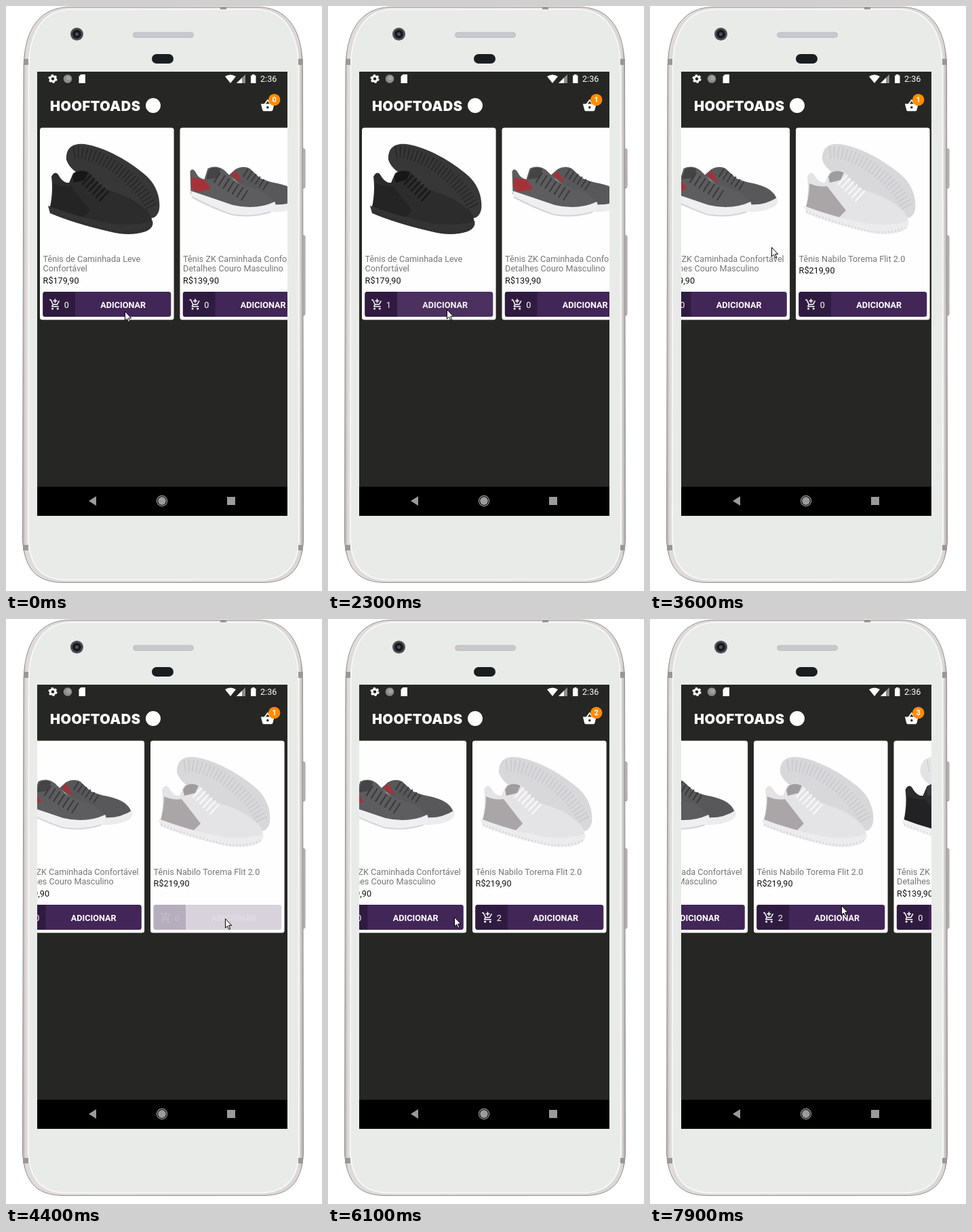
An HTML page that plays this animation: 466 by 864 pixels, repeating every 8 s.

```html
<!DOCTYPE html>
<html lang="pt-BR">
<head>
<meta charset="utf-8">
<title>Loja de tênis</title>
<style>
  html, body { margin: 0; width: 100%; height: 100%; overflow: hidden; background: #fff; }
  svg { display: block; }
  text { font: 12.65px Roboto, sans-serif; }
  .brand { font: 900 20px Inter, sans-serif; letter-spacing: .5px; }
  .bold { font-weight: 700; }
  .name { fill: #757575; }
  .line { fill: none; stroke: #fff; stroke-width: 2; }
  .button > * { opacity: var(--fade); }
</style>
</head>
<body>
<svg width="466" height="864" viewBox="0 0 466 864">
  <defs>
    <clipPath id="screen"><rect x="46" y="97" width="369" height="656"/></clipPath>
    <linearGradient id="rim">
      <stop offset="0" stop-color="#b5b0b0"/><stop offset=".012" stop-color="#e0dbdb"/>
      <stop offset=".988" stop-color="#dcd7d7"/><stop offset="1" stop-color="#a9a4a4"/>
    </linearGradient>
    <g id="cart">
      <path class="line" d="M1 3h2.6l4.3 9h8l4-7.3M8 12l-2 3.4q-.2.6.6.6H19M12 1v8M8 5h8"/>
      <circle cx="7" cy="20" r="2" fill="#fff"/><circle cx="17" cy="20" r="2" fill="#fff"/>
    </g>
  </defs>

  <!-- phone -->
  <g fill="#bdb8b8" stroke="#8f8b8b" stroke-width=".8">
    <rect x="435" y="211" width="6" height="58" rx="2"/>
    <rect x="435" y="339" width="6" height="118" rx="2"/>
  </g>
  <path d="M26 88C28 30 52 1.500 95 1.500H370C412 1.500 436 30 437.500 88L438.500 790C436 835 415 851 380 851.500H84C48 851 28 835 24.500 790Z" fill="url(#rim)" stroke="#938e8e"/>
  <path d="M33.500 88C35 36 56 5 97 5H368C408 5 430 36 431.500 88L432 790C430 830 410 847 376 847.500H88C54 847 36 830 33 790Z" fill="#e9ebe9" stroke="#f6f7f6" stroke-width="2"/>
  <path d="M26 78h7v9h-7zM431 78h7v9h-7zM25 796h8v8h-8zM431 796h7v8h-7zM316 1h9v4h-9z" fill="#9b9797"/>
  <circle cx="104.500" cy="41.500" r="9.500" fill="#4b4e54"/>
  <circle cx="104.500" cy="41.500" r="6.500" fill="#17191d"/>
  <circle cx="104.500" cy="41.500" r="2.500" fill="#4a5366"/>
  <rect x="187.500" y="39" width="89" height="7.500" rx="3.700" fill="#c9c8cd" stroke="#bdbcc1"/>
  <rect x="215" y="71" width="32" height="14" rx="7" fill="#1b1e21"/>

  <!-- screen -->
  <rect x="46" y="97" width="369" height="656" fill="#262625"/>
  <g fill="#fff">
    <circle cx="69" cy="107.500" r="3.800" fill="none" stroke="#fff" stroke-width="3"/>
    <circle cx="69" cy="107.500" r="5.600" fill="none" stroke="#fff" stroke-width="2" stroke-dasharray="3 2.860"/>
    <circle cx="91" cy="107.500" r="6.300" fill="#8b8b8b"/>
    <circle cx="92" cy="106.500" r="3.500" fill="#a2a2a2"/>
    <path d="M110.500 101H117v13h-9.500v-10z"/>
    <path d="M323 104q8-5 16 0l-8 10z"/>
    <path d="M353 101v13h-13z" fill="#8d8d8d"/><path d="M348 106v8h-8z"/>
    <path d="M361 102.500h2V101h3.500v1.500h2V114H361z"/>
    <text x="375" y="112" font-weight="500">2:36</text>
    <text class="brand" x="65" y="155">HOOFTOADS</text>
    <circle cx="217" cy="147" r="11"/>
    <g transform="translate(375 136.300) scale(.9)">
      <path fill-rule="evenodd" d="M1 9H23L20.400 19.500Q20 21 18.500 21H5.500Q4 21 3.600 19.500ZM10 15a2 2 0 0 0 4 0a2 2 0 0 0-4 0"/>
      <path class="line" d="M7 10L12 3L17 10"/>
    </g>
    <circle cx="395.700" cy="138.500" r="8.700" fill="#ff8c00"/>
    <text id="badge" class="bold" x="395.700" y="142.400" text-anchor="middle" style="font-size:11px"></text>
  </g>

  <g clip-path="url(#screen)"><g id="list"></g></g>

  <rect x="46" y="710" width="369" height="43"/>
  <g fill="#9b9b9b">
    <path d="M122 731l11-7v14z"/>
    <circle cx="230" cy="731" r="5.900"/>
    <circle cx="230" cy="731" r="7.600" fill="none" stroke="#9b9b9b" stroke-width="1.200"/>
    <rect x="326" y="725" width="12" height="12"/>
  </g>
  <path id="cursor" d="M.5.500V14L3.600 11.200L5.800 16.300L7.800 15.400L5.700 10.400H9.800Z" fill="#fff" stroke="#000"/>
</svg>

<script>
const $ = id => document.getElementById(id);
const path = (d, fill) => `<path d="${d}" fill="${fill}"/>`;
const ribs = (d, color, width, dash) =>
  `<path d="${d}" fill="none" stroke="${color}" stroke-width="${width}" stroke-dasharray="${dash}"/>`;

// A pair with one shoe turned to show its sole
const knit = c => `
  ${path("M39 227C38 208 50 202 66 204C95 208 132 229 156 250C172 264 178 284 176 300C174 311 167 315 158 313L110 280L62 250Q44 242 39 227Z", c.under)}
  ${ribs("M50 217C82 212 142 250 165 298", c.rib, 18, "1.5 4.5")}
  ${path("M17 252Q22 243 27 249Q34 262 43 261L49 247Q58 241 71 244L85 262Q92 269 104 273Q136 283 152 297Q167 308 165 320L140 328Q80 322 14 302Q20 275 17 252Z", c.upper)}
  ${path("M20 262Q34 268 46 266L74 302L62 314Q36 310 14 300Q20 282 20 262Z", c.side)}
  ${path("M48 252L52 246Q61 241 71 246L66 257L50 261Z", c.tag)}
  ${ribs("M68 256L98 284", c.lace, 20, "2.5 4.5")}
  ${path("M12 295Q56 312 108 322Q148 325 166 317Q169 327 156 333Q132 341 102 333Q50 321 15 306Z", c.sole)}
  ${ribs("M16 304Q60 321 106 332Q140 338 163 327", c.rib, 3, "1 4")}`;

const runner = `
  ${path("M72 250L82 241Q93 235 103 240L118 254Q128 259 144 262Q172 268 178 284Q176 293 160 294L138 294Q130 278 90 264Z", "#58585a")}
  ${path("M75 250L82 243L92 260L86 258Z", "#a63238")}
  ${ribs("M96 246L130 268", "#3a3a3c", 14, "2 5")}
  ${path("M138 293Q160 295 179 283Q183 292 172 298Q155 305 136 304Z", "#ececee")}
  ${path("M15 244Q19 238 24 247Q28 255 36 256L41 240Q54 234 66 243L80 257Q92 266 113 271Q134 279 140 293Q138 301 120 302Q70 300 16 278Z", "#5d5d5f")}
  ${path("M18 253L37 257L46 270L24 275L17 268Z", "#a63238")}
  ${path("M38 256L43 241Q52 236 60 241L55 254Z", "#444446")}
  ${ribs("M54 253L96 280", "#39393b", 18, "2 6")}
  ${path("M16 273Q46 283 78 294Q112 302 140 289Q144 301 130 307Q100 315 76 309Q44 299 17 284Z", "#efeff1")}
  ${ribs("M18 282Q45 297 76 308Q105 313 134 304", "#cfcfd2", 1.5, "none")}`;

const black = knit({ under: "#373737", rib: "#252525", upper: "#2c2c2c", side: "#242424", tag: "#171717", lace: "#181818", sole: "#343434" });
const white = knit({ under: "#d8d7da", rib: "#c8c7cb", upper: "#e4e4e6", side: "#aaa6a7", tag: "#a09c9d", lace: "#f8f8f8", sole: "#ececee" });
const mixed = knit({ under: "#e3e3e5", rib: "#d0d0d3", upper: "#2c2c2e", side: "#222224", tag: "#3b3b3d", lace: "#ededed", sole: "#f0f0f2" });
const walk = ["Tênis ZK Caminhada Confortável", "Detalhes Couro Masculino"];

// presses: [down, up] in ms
const items = [
  { art: black, name: ["Tênis de Caminhada Leve", "Confortável"], price: "179,90", presses: [[700, 900], [1700, 2100]] },
  { art: runner, name: walk, price: "139,90", presses: [[6300, 6600]] },
  { art: white, name: ["Tênis Nabilo Torema Flit 2.0"], price: "219,90", presses: [[4400, 4700], [5100, 5600]] },
  { art: mixed, name: walk, price: "139,90", presses: [] }
];

$("list").innerHTML = items.map((item, i) => `
  <g transform="translate(${50 + i * 206.5} 0)">
    <rect y="179.700" width="197.600" height="283.800" rx="3.500" fill="#fefefe"/>
    ${item.art}
    ${item.name.map((s, n) => `<text class="name" x="4.600" y="${377.800 + n * 14.5}">${s}</text>`).join("")}
    <text x="4.600" y="${380.600 + item.name.length * 14.5}" fill="#111">R$${item.price}</text>
    <g id="button${i}" class="button" fill="#fff">
      <rect x="4.400" y="421.900" width="188.900" height="37.100" rx="3.500" fill="#432658"/>
      <path d="M52 421.900H7.900a3.500 3.500 0 0 0-3.500 3.500v30.100a3.500 3.500 0 0 0 3.500 3.500H52z" fill="#301b40"/>
      <use href="#cart" transform="translate(13.300 431.700) scale(.76)"/>
      <text id="count${i}" x="35.700" y="445.500"></text>
      <text class="bold" x="122.700" y="445.500" text-anchor="middle">ADICIONAR</text>
    </g>
  </g>`).join("");

// Keys: [ms, values...]
const scrollKeys = [[2900, 0], [3000, 14], [3100, 68], [3200, 129.3], [3300, 182], [3400, 217],
  [3500, 238], [3600, 248], [3800, 250], [7400, 250], [7500, 260], [7700, 290], [7900, 310]];
const cursorKeys = [[100, 175, 450.5], [200, 175, 450], [300, 175, 450], [400, 175, 448], [2300, 175, 448],
  [2700, 284, 380], [2900, 275, 357], [3000, 246, 357], [3200, 128, 352], [3300, 116, 352],
  [3600, 179, 356], [3800, 262, 420], [4300, 323, 442], [4700, 323, 443], [5600, 323, 443],
  [6100, 186, 440], [6800, 186, 440], [7300, 249, 365], [7500, 300, 372], [7700, 262, 395], [7900, 282, 423]];

function at(keys, t) {
  const i = keys.findIndex(k => k[0] >= t);
  if (i < 0) return keys[keys.length - 1].slice(1);
  if (i === 0) return keys[0].slice(1);
  const a = keys[i - 1], b = keys[i], p = (t - a[0]) / (b[0] - a[0]);
  return a.slice(1).map((v, n) => v + (b[n + 1] - v) * p);
}

// Dims at once on press, eases back after release
function opacity(presses, t) {
  const last = presses.filter(p => p[0] <= t).pop();
  if (!last) return 1;
  if (t < last[1]) return 0.2;
  const left = Math.max(0, 1 - (t - last[1] + 100) / 400);
  return 1 - 0.8 * left * left;
}

function draw(now) {
  const t = Math.floor(now % 8000 / 100) * 100;
  let kinds = 0;
  items.forEach(({ presses }, i) => {
    const count = presses.filter(p => p[1] + 300 <= t).length;
    if (count) kinds++;
    $("count" + i).textContent = count;
    $("button" + i).style.setProperty("--fade", opacity(presses, t));
  });
  $("badge").textContent = kinds;
  $("list").setAttribute("transform", `translate(${-at(scrollKeys, t)[0]} 0)`);
  $("cursor").setAttribute("transform", `translate(${at(cursorKeys, t)})`);
}

const start = performance.now();
function tick() {
  draw(performance.now() - start);
  requestAnimationFrame(tick);
}
tick();
</script>
</body>
</html>
```
